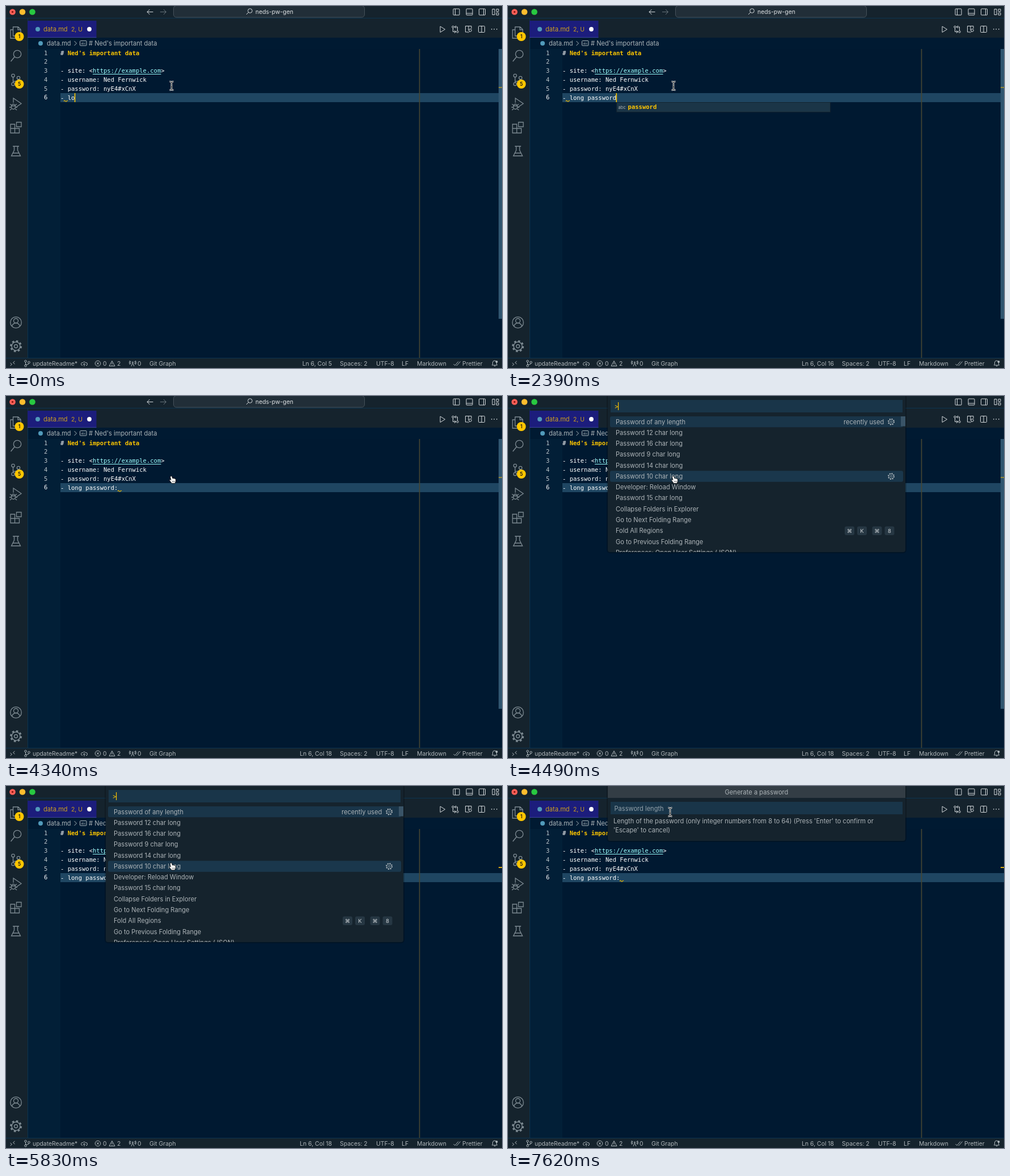
Recreate the animation shown at these times as an HTML page. Size 875 by 640 pixels, loop 8000 ms.

```html
<!DOCTYPE html>
<html lang="en">
<head>
<meta charset="utf-8">
<title>Password generator</title>
<style>
  html, body { margin: 0; width: 100%; height: 100%; overflow: hidden; background: #001931 }
  svg { display: block; width: 100%; height: 100% }
  text { font: 11.1px Inter, sans-serif; fill: #adb4b8; white-space: pre }
  .code text, .mono { font: 10.53px "DejaVu Sans Mono", monospace; fill: #fff }
  .small text { font-size: 10.4px }
  .gold { fill: #ffc600 !important }
  .bold { font-weight: bold }
  .icon { fill: none; stroke: #adb6bb; stroke-width: 1 }
  .side { stroke: #7d8a92; stroke-width: 1.3 }
  .white { stroke: #d5dadd }
</style>
</head>
<body>
<svg viewBox="0 0 875 640" preserveAspectRatio="none">
  <defs>
    <g id="gear">
      <circle r="7.7" stroke-width="3" stroke-dasharray="3 3.05"/>
      <circle r="6.5"/><circle r="2.6"/>
    </g>
    <g id="layout"><rect x="-5.5" y="-5.5" width="11" height="11" rx="1"/></g>
    <g id="glass"><circle cx="1.5" cy="-1.5" r="3.8"/><path d="M-1.2 1.2-5 5"/></g>
    <g id="branch">
      <circle cx="-3" cy="-4" r="1.8"/><circle cx="-3" cy="4" r="1.8"/><circle cx="3" cy="-2" r="1.8"/>
      <path d="M-3-2.2V2.2M3-.2Q3 2-3 2"/>
    </g>
    <path id="wave" d="M0 1.5q1.2-2.5 2.4-.6t2.4.4 2.2-.6" fill="none" stroke="#e0ae00" stroke-width="1.1"/>
  </defs>

  <!-- window frame -->
  <rect width="875" height="640" fill="#001931"/>
  <rect x="38" y="76" width="58" height="547" fill="#021f37"/>
  <rect width="875" height="56" fill="#15232d"/>
  <rect x="38" y="56" width="837" height="20" fill="#001a32"/>
  <rect y="21" width="38" height="602" fill="#15232d"/>
  <rect y="623" width="875" height="17" fill="#15232d"/>
  <path d="M0 21.5H875M38.5 22V623M0 622.5H875" stroke="#0d3450" fill="none"/>
  <circle cx="11.5" cy="10.5" r="5.3" fill="#ff5f57"/><circle cx="11.5" cy="10.5" r="1.7" fill="#8a1712"/>
  <circle cx="29" cy="10.5" r="5.3" fill="#febc2e"/>
  <circle cx="46.5" cy="10.5" r="5.3" fill="#28c840"/>
  <rect x="295.5" y="-.5" width="337" height="20.500" rx="5" fill="#212e38" stroke="#45515a"/>
  <g class="small"><text x="440" y="14" style="fill:#dde1e3">neds-pw-gen</text></g>
  <g class="icon white">
    <path d="M259.500 10.500H249M253.500 6l-4.500 4.500 4.500 4.500"/>
    <path d="M272 10.500h10.500M278 6l4.500 4.500-4.500 4.500" stroke="#66727a"/>
    <use href="#glass" x="429" y="10"/>
    <use href="#layout" x="794.500" y="10.500"/><path d="M792.500 5v11"/>
    <use href="#layout" x="817.500" y="10.500"/><path d="M812 13h11"/>
    <use href="#layout" x="840" y="10.500"/><path d="M842.500 5v11"/>
    <path d="M858 5.500h4v10h-4zM865 5.500h4v4h-4zM865 12h4v4h-4z"/>
  </g>

  <!-- tab and breadcrumb -->
  <rect x="38" y="26" width="121.500" height="30" fill="#1c1d7c"/>
  <path d="M38 55.500H159.500" stroke="#3d439a"/>
  <g fill="#519aba"><circle cx="56" cy="41" r="4"/><circle cx="61" cy="66" r="4"/></g>
  <g fill="#cda01e">
    <text x="66" y="45" style="fill:inherit">data.md</text>
    <g class="small"><text id="tabCount" x="115" y="45" style="fill:inherit"></text></g>
  </g>
  <circle cx="147" cy="41" r="3.900" fill="#fff"/>
  <text x="72" y="70">data.md</text>
  <text x="146" y="70"># Ned's important data</text>
  <g class="icon">
    <path d="M120.500 62l4 4-4 4"/>
    <rect x="130.500" y="61.500" width="11.500" height="8.500" rx="1"/>
  </g>
  <text x="132.300" y="68" style="font-size:4.800px">abc</text>
  <g class="icon white">
    <path d="M766 36v10.500l8.500-5.200z"/>
    <circle cx="788.500" cy="37" r="1.700"/><circle cx="796.500" cy="45.500" r="1.700"/>
    <path d="M788.500 39v6.500h5M791 43l2.500 2.500L791 48M796.500 43.500V37h-5M794 34.500L791.500 37l2.500 2.500"/>
    <path d="M815 46h-4.500V35.500H821V40M816 35.500V43"/><circle cx="819" cy="43" r="2.300"/><path d="M817.500 45l-2.500 2.500"/>
    <use href="#layout" x="839" y="41"/><path d="M839 35.500v11"/>
    <path d="M856 41h1.500m3 0h1.500m3 0h1.500" stroke-width="1.500"/>
  </g>

  <!-- activity bar -->
  <g class="icon side">
    <path d="M12.500 41v-4h9l4.500 4.500V53H12.500zM21 37v5h5M12 42H8v15h11v-4"/>
    <circle cx="20" cy="85" r="6.700"/><path d="M15 90l-6.500 8"/>
    <circle cx="12.500" cy="123" r="2.700"/><circle cx="12.500" cy="138" r="2.700"/><circle cx="22" cy="127" r="2.700"/>
    <path d="M12.500 126v9M22 130q0 3-9.500 3.500"/>
    <path d="M13 171v-8l14 9.500-9.500 6.500"/>
    <ellipse cx="13" cy="178" rx="3.500" ry="4.500"/><path d="M9.500 176.500h7M7 173.500l3 2M19 173.500l-3 2M6 179h3.500M16.500 179H20M7 184l3-2.500M19 184l-3-2.500"/>
    <path d="M8 209h7.500v15.500H8zM8 216.500h15.500v8H8M18.500 205.500H27v8h-8.500z"/>
    <path d="M12 248h11M14.500 248v7L9.500 265h16l-5-10v-7M12 260h11"/>
    <circle cx="17.500" cy="559.500" r="9.800"/><circle cx="17.500" cy="556.500" r="4"/><path d="M10.500 566q2-5.500 7-5.500t7 5.500"/>
    <use href="#gear" transform="translate(17.500 601.500) scale(1.150)"/>
  </g>
  <g class="bold" text-anchor="middle">
    <circle cx="23.500" cy="54" r="8" class="gold"/><circle cx="23.500" cy="138" r="8" class="gold"/>
    <text x="23.500" y="57" style="font-size:8.500px;font-weight:600;fill:#111">1</text>
    <text x="23.500" y="141" style="font-size:8.500px;font-weight:600;fill:#111">5</text>
  </g>

  <!-- status bar -->
  <g class="small">
    <text x="47" y="636">updateReadme*</text>
    <text x="171" y="636">0</text><text id="warnCount" x="196" y="636"></text><text x="232" y="636">0</text>
    <text x="253" y="636">Git Graph</text>
    <text id="position" x="575" y="636" text-anchor="end"></text>
    <text x="589" y="636">Spaces: 2</text><text x="653" y="636">UTF-8</text><text x="698" y="636">LF</text>
    <text x="725" y="636">Markdown</text><text x="805" y="636">Prettier</text>
  </g>
  <g class="icon">
    <path d="M7.500 631l3 2.500-3 2.500M15.500 628l-3 2.500 3 2.500"/>
    <use href="#branch" x="37.500" y="632"/>
    <path d="M135 635.500q-3-.5-2.500-3t3-2q2-3 5 0 3-.5 3 2.500t-2.500 2.500M138 637v-5m-2 2l2-2 2 2"/>
    <circle cx="162" cy="632" r="4.800"/><path d="M160 630l4 4m0-4l-4 4"/>
    <path d="M187 627.500l5 9h-10zM187 630.500v3M187 634.500v1"/>
    <path d="M221 637l2.500-6 2.500 6M220 628q-2 2.500 0 5M227 628q2 2.500 0 5M218.500 627q-2 4 0 7M228.500 627q2 4 0 7"/>
    <circle cx="223.500" cy="630" r="1"/>
    <path d="M789.500 633l2.500 2.500 6-7M794.500 635.500l1 0 6-7"/>
    <path d="M857.500 635h9l-1-2v-3q-.5-3-3.500-3t-3.500 3v3zM861 636.500h2.500"/>
  </g>
  <circle cx="865.500" cy="629" r="2" fill="#adb6bb"/>

  <!-- editor -->
  <rect x="96" y="154" width="779" height="16" fill="#1f4662"/>
  <rect x="728.700" y="76" width="1.600" height="546" fill="#484732"/>
  <g id="scrollbar"><rect x="869" y="76" width="6" height="477" fill="#305570"/></g>
  <rect id="mark" x="869" y="143" width="6" height="2" fill="#d6a612"/>
  <g class="code">
    <g id="numbers"></g>
    <text x="96" y="86.700"># <tspan class="gold bold">Ned's important data</tspan></text>
    <text x="96" y="118.200">- site: &lt;<tspan fill="#9effff">https://example.com</tspan>&gt;</text>
    <path d="M153 120.500h120.500" stroke="#9effff"/>
    <text x="96" y="134">- username: Ned Fernwick</text>
    <text x="96" y="149.700">- password: nyE4#xCnX</text>
    <text x="96" y="165.500"><tspan id="typed"></tspan><tspan id="ghost" fill="#7b93a5" font-style="italic"></tspan></text>
  </g>
  <use id="squiggle" href="#wave" y="167"/>
  <rect id="caret" y="154" width="1.600" height="16" class="gold"/>
  <g id="suggest">
    <rect y="170.500" width="377" height="17" fill="#1b3547" stroke="#13232f"/>
    <text x="3" y="181.500" style="font-size:7.500px">abc</text>
    <text x="20" y="182" class="mono" style="fill:#c2cace"><tspan id="match" class="gold bold"></tspan><tspan id="rest"></tspan></text>
  </g>

  <!-- command palette -->
  <g id="palette">
    <rect x="174" y="-4" width="529" height="282" rx="6" fill="#000" opacity=".22"/>
    <path d="M176 0H701V272q0 4-4 4H180q-4 0-4-4z" fill="#15232d"/>
    <rect x="181" y="7" width="515" height="22" fill="#193549"/>
    <text x="187.500" y="22.500" class="gold">&gt;</text>
    <rect x="180" y="36" width="517" height="19.300" rx="3" fill="#193549"/>
    <g id="hover">
      <rect x="180" y="36" width="517" height="19.300" rx="3" fill="#1a374c"/>
      <use href="#gear" class="icon" transform="translate(676 45.600) scale(.65)"/>
    </g>
    <text x="592" y="49.600">recently used</text>
    <use href="#gear" class="icon" transform="translate(676 45.600) scale(.65)"/>
    <rect x="693" y="36" width="8" height="17.500" fill="#3a5467"/>
    <svg width="875" height="276"><g id="commands"></g></svg>
    <g id="keys" text-anchor="middle"></g>
    <rect id="paletteCaret" x="194" y="11" width="1.200" height="14" class="gold"/>
  </g>

  <!-- length prompt -->
  <g id="prompt">
    <rect x="174" y="-4" width="529" height="103" rx="6" fill="#000" opacity=".22"/>
    <path d="M176 0H701V93q0 4-4 4H180q-4 0-4-4z" fill="#15232d"/>
    <rect x="176" width="525" height="21" fill="#333d45"/>
    <text x="438.500" y="14.700" text-anchor="middle">Generate a password</text>
    <rect x="181" y="28" width="515" height="22" fill="#193549"/>
    <text x="187.500" y="43.500" style="fill:#93a1aa">Password length</text>
    <text x="186" y="66">Length of the password (only integer numbers from 8 to 64) (Press 'Enter' to confirm or</text>
    <text x="186" y="82">'Escape' to cancel)</text>
    <rect id="promptCaret" x="187" y="32" width="1.200" height="14" class="gold"/>
  </g>

  <!-- pointers, centred on their own origin -->
  <g id="beam" fill="none">
    <path d="M-3.500-7.500q3 0 3.500 1.500.5-1.500 3.500-1.500M0-6V6M-3.500 7.500q3 0 3.500-1.500.5 1.500 3.500 1.500M-1.500 2h3" stroke="#fff" stroke-width="2.600"/>
    <path d="M-3.500-7.500q3 0 3.500 1.500.5-1.500 3.500-1.500M0-6V6M-3.500 7.500q3 0 3.500-1.500.5 1.500 3.500 1.500M-1.500 2h3" stroke="#111"/>
  </g>
  <g id="hand">
    <path d="M-3-6q1.300-1.200 2.300.3L.5-2.200q1-.9 2 .1 1.200-.7 1.900.4 1.600-.2 1.600 1.500V3L4.500 6.500H-1L-5 1.200q-.5-1.800 1.300-1.500l1.200 1-1.200-5q-.1-1.200.7-1.700z" fill="#fff" stroke="#111" stroke-width=".9"/>
    <path d="M0 2v2.500M2 2v2.500M3.800 2v2.500" stroke="#333" stroke-width=".7"/>
  </g>
  <circle id="ring" cx="287" cy="46" r="8" fill="none" stroke="#dfe5e8" stroke-width="1.300"/>
</svg>

<script>
const LOOP = 8000, CHAR_WIDTH = 6.34, ROW = 19.27;
const KEY_TIMES = [300, 600, 750, 1040, 1190, 1490, 1640, 1790, 1940, 2240, 2390, 2990, 3590];
const LINE = '- long password: ', WORD = 'password';
const $ = id => document.getElementById(id);
const show = (id, on) => $(id).style.display = on ? '' : 'none';
const write = (id, text) => { if ($(id).textContent !== text) $(id).textContent = text; };
const place = (id, x, y) => $(id).setAttribute('transform', `translate(${x} ${y})`);
const within = (t, start, end) => t >= start && t < end;

$('numbers').innerHTML = [1, 2, 3, 4, 5, 6].map(n =>
  `<text x="67" y="${70.95 + n * 15.75}" style="fill:${n < 6 ? '#bcc5ca' : '#fff'}">${n}</text>`).join('');

$('commands').innerHTML = [
  'Password of any length', 'Password 12 char long', 'Password 16 char long', 'Password 9 char long',
  'Password 14 char long', 'Password 10 char long', 'Developer: Reload Window', 'Password 15 char long',
  'Collapse Folders in Explorer', 'Go to Next Folding Range', 'Fold All Regions',
  'Go to Previous Folding Range', 'Preferences: Open User Settings (JSON)'
].map((name, i) => `<text x="190" y="${49.6 + i * ROW}">${name}</text>`).join('');

$('keys').innerHTML = [[602.5, '⌘'], [624.5, 'K'], [651, '⌘'], [673, '8']].map(([x, key]) =>
  `<rect x="${x - 8.5}" y="230.500" width="17" height="15.500" rx="3" fill="#263743"/>
   <text x="${x}" y="242" style="font:9.5px Inter,'DejaVu Sans',sans-serif;fill:#d0d5d8">${key}</text>`).join('');

function drawEditor(t) {
  const count = 4 + KEY_TIMES.filter(time => time <= t).length;
  const typed = LINE.slice(0, count), caretX = 96 + count * CHAR_WIDTH;
  const prefix = count - LINE.indexOf(WORD);
  const suggesting = prefix > 0 && prefix <= WORD.length;
  write('typed', typed);
  write('ghost', suggesting ? WORD.slice(prefix) : '');
  write('match', WORD.slice(0, Math.max(prefix, 0)));
  write('rest', WORD.slice(Math.max(prefix, 0)));
  show('suggest', suggesting);
  place('suggest', caretX + .5, 0);
  $('caret').setAttribute('x', caretX - .6);
  show('caret', t < 4040);

  const settled = within(t, 3140, 4040);
  write('tabCount', settled ? '1, U' : '2, U');
  write('warnCount', settled ? '1' : '2');
  write('position', `Ln 6, Col ${count + 1}`);
  show('squiggle', !settled);
  $('squiggle').setAttribute('x', t < 3140 ? 102 : 197);
  $('scrollbar').style.opacity = t < 4790 ? 1 : t < 4940 ? .5 : t < 5240 ? .12 : 0;
  $('mark').style.opacity = t < 5240 ? .6 : 1;
}

function drawOverlays(t) {
  show('palette', within(t, 4490, 7180));
  show('paletteCaret', within(t, 4490, 4940) || within(t, 5390, 5840) || within(t, 6290, 6880));
  show('prompt', t >= 7180);
  show('promptCaret', t < 7620);

  // The pointer advances in seven even steps, slow at both ends.
  const step = Math.min(7, Math.max(0, Math.floor((t - 5690) / 149) + 1)) / 7;
  const ease = step * step * (3 - 2 * step);
  const x = 293.5 - 6.5 * ease, y = 148 - 102 * ease;
  const hovered = Math.max(0, Math.floor((y - 41) / ROW));
  place('hover', 0, hovered * ROW);
  place('hand', x, y);
  place('beam', t < 4190 ? 292 : 286, t < 4190 ? 141 : 46);
  show('hand', within(t, 4190, 7180));
  show('beam', t < 4190 || t >= 7030);
  show('ring', within(t, 7030, 7180));
}

function frame(now) {
  const t = now % LOOP;
  drawEditor(t);
  drawOverlays(t);
  requestAnimationFrame(frame);
}
requestAnimationFrame(frame);
</script>
</body>
</html>
```
